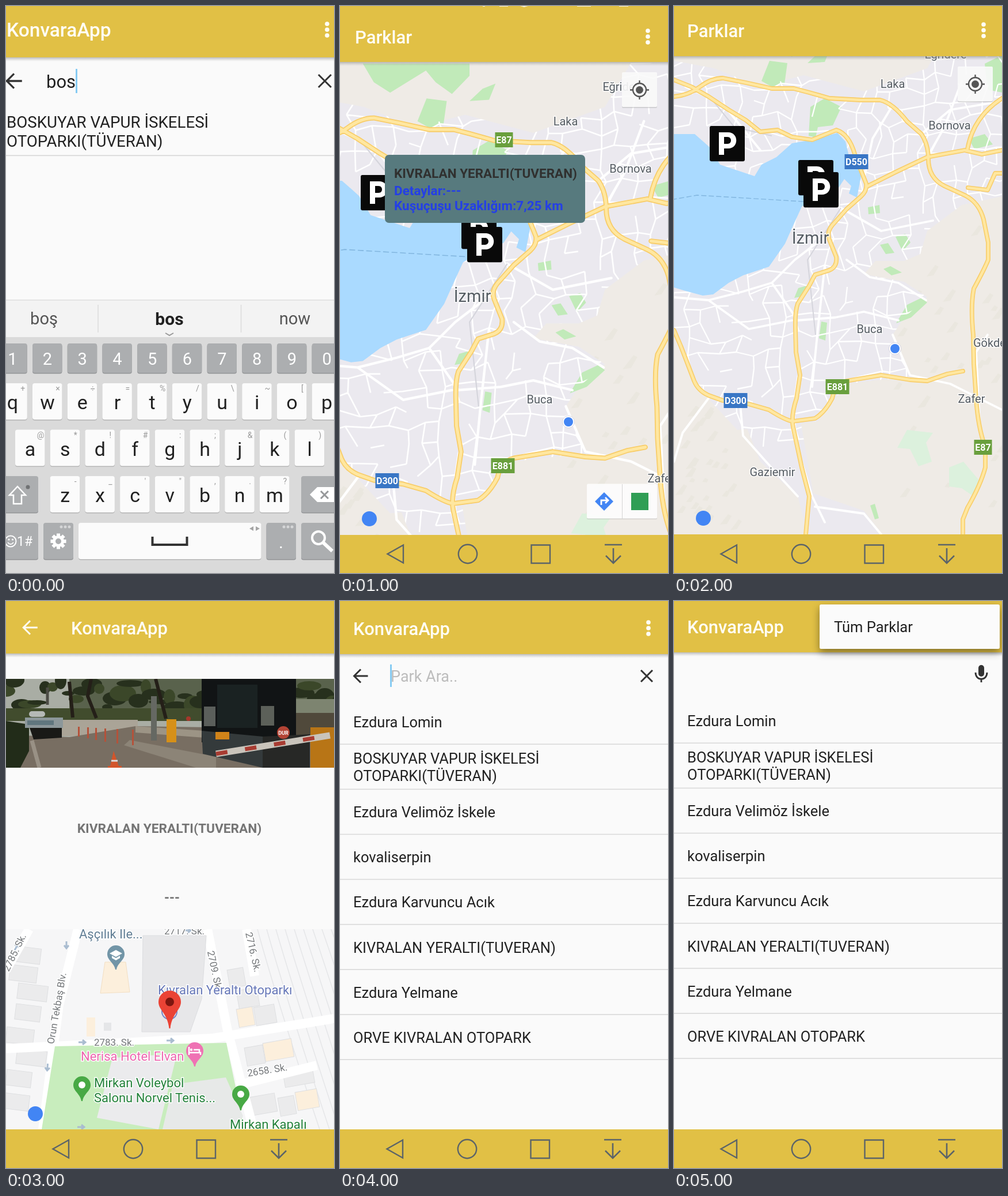
An HTML page that plays this animation: 570 by 983 pixels, repeating every 6 s.

```html
<!DOCTYPE html>
<html lang="tr">
<head>
<meta charset="utf-8">
<title>Park app tour</title>
<style>
  html, body { margin: 0; width: 100%; height: 100%; overflow: hidden; background: #fafafa; }
  svg { display: block; width: 570px; height: 983px; font-family: Roboto, sans-serif; }
</style>
</head>
<body>
<svg id="stage" viewBox="0 0 570 983"></svg>
<script>
const GOLD = '#e1c045', INK = '#212121', ICON = '#5c6468';
const SCENE_MS = 1000;

// Drawing helpers
const esc = s => s.replace(/&/g, '&amp;').replace(/</g, '&lt;');
const text = (x, y, size, s, fill = INK, extra = '') =>
  `<text x="${x}" y="${y}" font-size="${size}" fill="${fill}" ${extra}>${esc(s)}</text>`;
const rect = (x, y, w, h, fill, extra = '') =>
  `<rect x="${x}" y="${y}" width="${w}" height="${h}" fill="${fill}" ${extra}/>`;
const circle = (x, y, r, fill, extra = '') => `<circle cx="${x}" cy="${y}" r="${r}" fill="${fill}" ${extra}/>`;
const shape = (d, fill, extra = '') => `<path d="${d}" fill="${fill}" ${extra}/>`;
const line = (d, color, width, extra = '') =>
  `<path d="${d}" fill="none" stroke="${color}" stroke-width="${width}" ${extra}/>`;
const at = (x, y, body, more = '') => `<g transform="translate(${x} ${y}) ${more}">${body}</g>`;
const MID = 'text-anchor="middle"', BOLD = 'font-weight="700"', MEDIUM = 'font-weight="500"';
const ROUND = 'stroke-linejoin="round" stroke-linecap="round"';

let seed = 11;
const random = () => (seed = (seed * 16807) % 2147483647) / 2147483647;

// App chrome
const header = h => rect(0, 0, 570, h, GOLD) + rect(0, h, 570, 7, 'url(#shade)');
const title = (x, y, s, size = 31) => text(x, y, size, s, '#fffdf5', MEDIUM);
const dots = (x, y) => [-10, 0, 10].map(d => circle(x, y + d, 3.8, '#fffdf5')).join('');
const backArrow = (x, y, color, k = 1) =>
  at(x, y, line('M12.5 0H-11M0 -11.5L-11.5 0L0 11.5', color, 3), `scale(${k})`);
const cross = (x, y, r) => line(`M${x - r} ${y - r}l${2 * r} ${2 * r}m0 ${-2 * r}l${-2 * r} ${2 * r}`, '#333', 3);
const navBar = (top = 916, dx = 0) => rect(0, top, 570, 983 - top, GOLD) + at(dx, 0,
  line('M109 934.5V965.5L81.500 950Z', ICON, 2.4) +
  circle(221, 950, 16.2, 'none', `stroke="${ICON}" stroke-width="2.4"`) +
  line('M331.500 934.5H364V966H331.500Z', ICON, 2.4) +
  line('M459 934H489M474 940V965M461 953L474 966L487 953', ICON, 2.6));

// Keyboard
const key = (x, y, w, h, dark) =>
  rect(x, y + 1.5, w, h, dark ? '#929496' : '#b5b5b5', 'rx="4"') + rect(x, y, w, h, dark ? '#acaeb0' : '#fbfbfb', 'rx="4"');

function keyRow(chars, hints, x0, y) {
  return [...chars].map((c, i) => {
    const x = x0 + i * 60.7;
    return key(x, y, 51.5, 63) + text(x + 26, y + 45, 34, c, INK, MID) +
      (hints[i] ? text(x + 44, y + 14, 14, hints[i], '#999', MID) : '');
  }).join('');
}

function keyboard() {
  const numbers = [...'1234567890'].map((c, i) => {
    const x = -14.7 + i * 60.7;
    return key(x, 585, 51.5, 51, true) + text(x + 26, 622, 29, c, '#fff', MID);
  }).join('');
  const teeth = [0, 45, 90, 135, 180, 225, 270, 315].map(a =>
    rect(-3, -13.5, 6, 7, '#fff', `transform="rotate(${a})"`)).join('');
  const more = x => [0, 7, 14].map(d => circle(x + d, 903, 2.5, '#d5d6d7')).join('');
  return rect(0, 510, 570, 64, '#f3f3f3') + rect(0, 509, 570, 1.5, '#dedede') +
    rect(0, 574, 570, 409, '#dadada') +
    line('M160 518V566M408.500 518V566', '#dcdcdc', 1.5) +
    text(66, 552, 29, 'boş', '#555', MID) + text(284, 553, 30, 'bos', INK, MID + ' ' + BOLD) +
    text(502, 552, 29, 'now', '#555', MID) + line('M277 567L284 571L291 567', '#999', 2) +
    numbers +
    keyRow('qwertyuiop', '+×÷=%/\\~[', -14.7, 654) +
    keyRow('asdfghjkl', '@*!#:;&()', 16, 734.5) +
    keyRow('zxcvbnm', '-_\'",.?', 76.7, 815) +
    key(-20, 815, 76, 63, true) + key(513, 815, 80, 63, true) +
    [[-20, 76], [65, 52], [452.5, 51.5], [513, 80]].map(([x, w]) => key(x, 896, w, 63, true)).join('') +
    key(126, 896, 317.5, 63) +
    line('M20 833L34 848H27V863H13V848H6Z', '#fff', 2.5) + circle(38, 834, 3.5, '#707274') +
    shape('M528 847L541 834H580V860H541Z', '#fff') + line('M547 841l13 13m0 -13l-13 13', '#96989a', 3) +
    circle(8, 928, 9.5, 'none', 'stroke="#fff" stroke-width="2"') + circle(5, 925, 1.6, '#fff') + circle(11.5, 925, 1.6, '#fff') +
    line('M3 930Q8 936 13 930', '#fff', 1.8) + text(19, 936, 23, '1#', '#fff') +
    more(96) + more(483) +
    at(91, 928, teeth + circle(0, 0, 7.5, 'none', 'stroke="#fff" stroke-width="5"')) +
    line('M254.500 920V934H314.500V920', '#333', 4) +
    shape('M430 902V910L423 906ZM434 902V910L441 906Z', '#a5a5a5') + text(478, 940, 30, '.', '#fff', MID) +
    circle(543, 922, 11, 'none', 'stroke="#fff" stroke-width="4"') + line('M551 930L567 945', '#fff', 6);
}

// City map, shared by both map screens
const URBAN = 'M0 95L70 108L150 140L225 120L330 148L440 108L480 40H570V330L500 345L440 390L428 430L400 442H350L330 465L400 478L440 505L400 540L380 570L412 642L300 655L250 720L215 725L110 735L45 665L0 560Z' +
  'M110 690L220 720L242 845L330 875L362 916H232L215 850L150 790Z';
const SEA = 'M0 222H36L52 236L62 245L80 275L140 295L152 275L178 262L205 238L240 232L284 220L298 235L306 268L326 290L318 332L304 325L308 312L296 300L284 318L260 323L222 348L205 385L193 412L165 452L120 467L95 480L68 500L50 502L20 494L0 488Z';
const PARKS = 'M152 130L166 95L197 99L192 135L170 140ZM68 41H232V60L205 88L180 70L165 52L110 86L85 70ZM232 99L252 80L272 72L262 97ZM234 225L237 175L262 160L291 175L276 207L250 210L246 228ZM512 230L540 222L554 240L522 248ZM540 100L570 85V150L545 145ZM337 349L357 345L358 359L338 361ZM358 414L372 411L383 428L368 430ZM385 400L402 395L411 410L397 425ZM364 456L376 451L396 462L378 467ZM386 550L405 518L430 506L440 514L412 540ZM252 576L256 547L266 549L263 580ZM209 506L216 489L237 483L227 503ZM341 866L349 863L356 888L349 890Z';
const MEADOWS = 'M388 766L405 735L450 740L438 757L448 790L425 798L410 768ZM478 800L503 790L535 828L523 852L500 836L478 833Z';
const HIGHWAYS = [
  'M0 157Q25 155 45 140T85 125L125 133L170 143H208Q240 151 270 160L325 163H358Q380 168 405 200L430 222Q442 240 442 265Q442 298 470 312L505 328Q530 340 538 370L546 410V440Q540 455 521 490Q515 520 520 570L521 620L525 680Q528 730 541 765V800Q533 830 510 870L502 890V916',
  'M0 128L30 140L60 157L95 180L125 198L150 218L180 215L205 227L240 232L282 215Q305 222 315 260L334 308Q336 320 325 330L300 352L275 380Q265 392 270 405L282 435Q284 452 270 458L245 466L235 485L215 516Q210 530 211 560L212 600L219 640L213 680Q203 710 207 730L222 800L235 850L229 916',
  'M335 313L385 288L440 262L505 250L535 257L570 250M510 248Q515 220 530 198T570 160M511 315L545 319L558 290H570',
  'M0 562L12 590L35 650Q42 667 60 675L85 684L130 690L165 700Q195 719 207 720L245 715Q262 705 275 680Q280 655 300 650L360 640L410 648L440 650L475 638L502 633'
];
const STREETS = 'M0 505L60 510L120 495L170 480L210 440L262 400M60 510L130 560L205 545M170 480L215 545L280 540L330 530L390 545M290 350L360 390L450 372M300 440L340 470L390 480L438 510M380 570L410 640L480 655L570 700M262 450L250 560L240 660M20 140L85 170L150 250M205 735L240 850L262 895M115 690L120 745L160 790L215 850M0 790L15 740L60 680M380 172L345 230L330 300M430 222L480 180L570 165M440 262L470 210L500 130M245 868L330 880L360 916M545 570L525 600L531 720';

function streetWeb() {
  const step = 27, cols = 23, rows = 28, nodes = [];
  for (let r = 0; r < rows; r++) for (let c = 0; c < cols; c++)
    nodes.push([(c - .5) * step + random() * 17 + (r % 3) * 4, 35 + r * step + random() * 17 - c * 2]
      .map(Math.round));
  let d = '';
  nodes.forEach((p, i) => {
    if (i % cols < cols - 1 && random() < .64) d += `M${p}L${nodes[i + 1]}`;
    if (nodes[i + cols] && random() < .64) d += `M${p}L${nodes[i + cols]}`;
  });
  return line(d, '#fff', 2.3, 'clip-path="url(#urban)"');
}

function hills() {
  let d = '';
  for (let i = 0; i < 60; i++) {
    const left = i % 2, x = left ? random() * 100 : 360 + random() * 200;
    const y = left ? 690 + random() * 220 : 390 + random() * 480, s = 5 + random() * 12;
    d += `M${x.toFixed()} ${y.toFixed()}l${s.toFixed()} ${(-s * 1.3).toFixed()}l6 3l-${(s * .6).toFixed()} ${s.toFixed()}Z`;
  }
  return shape(d, '#e8e5db', 'opacity=".6"');
}

const world = () => rect(-40, 0, 660, 983, '#efebe6') + hills() + shape(URBAN, '#ebe9ef') +
  shape(MEADOWS, '#dcf1dd') + shape(PARKS, '#c1eab9') + streetWeb() + shape(SEA, '#aadaff') +
  line(STREETS, '#fff', 3.8, ROUND) + line('M290 350L232 440L246 570M60 155L105 210L170 225', '#d5d5dc', 2) +
  line('M-30 337L0 335L40 328L225 339', '#82b6df', 1.4, 'stroke-dasharray="9 4"') +
  line(HIGHWAYS.join(''), '#f8cd69', 7.8, ROUND) + line(HIGHWAYS.join(''), '#ffe7a0', 4.6, ROUND);

const place = (x, y, s, size = 20) => text(x, y, size, s, '#555c63',
  `${MID} stroke="#fff" stroke-width="3" stroke-opacity=".75" paint-order="stroke"`);
const shield = (x, y, s, color) => {
  const w = s.length * 10 + 1;
  return rect(x - w / 2, y - 13, w, 26, color) + text(x, y + 6, 16, s, '#fff', MID + ' ' + BOLD);
};
const GREEN = '#699f3d', BLUE = '#3976c5';
const parkMarker = (x, y) => at(x, y, rect(0, 1, 61, 61, '#000', 'rx="4" opacity=".3"') +
  rect(0, 0, 61, 61, '#090909', 'rx="3"') +
  shape('M16 11H32C51 11 51 39 32 39H25V50H16ZM25 19V31H31C39 31 39 19 31 19Z', '#fff', 'fill-rule="evenodd"'));
const locateButton = (x, y) => at(x, y, rect(0, 1, 61, 61, '#aaa', 'rx="2" opacity=".4"') +
  rect(0, 0, 61, 60, '#fff', 'rx="2" opacity=".85"') + circle(30.5, 30.5, 6.5, '#555') +
  circle(30.5, 30.5, 11.5, 'none', 'stroke="#555" stroke-width="2.3"') +
  line('M30.500 14V20M30.500 41V47M14 30.500H20M41 30.500H47', '#555', 2.3));
const here = (x, y) => circle(x, y, 10.5, '#fff', 'stroke="#ccd" stroke-width=".8"') + circle(x, y, 8, '#4285f4');
const mapBadge = y => circle(51, y, 13, '#4285f4');

// Screens
const APP = 'KonvaraApp', SITE = 'KIVRALAN YERALTI(TUVERAN)';
const ROWS = [
  'Ezdura Lomin', ['BOSKUYAR VAPUR İSKELESİ', 'OTOPARKI(TÜVERAN)'], 'Ezdura Velimöz İskele', 'kovaliserpin',
  'Ezdura Karvuncu Acık', SITE, 'Ezdura Yelmane', 'ORVE KIVRALAN OTOPARK'
];

const parkList = (x, y) => ROWS.map((row, i) => {
  const base = y + i * 78.1;
  const label = Array.isArray(row)
    ? row.map((s, n) => text(x, base - 15 + n * 30, 25.5, s)).join('')
    : text(x, base, 25.5, row);
  return label + rect(0, base + 28.5, 570, 1.6, '#d9d9d9');
}).join('');

const typing = () => header(89) + title(1, 53, APP, 33.5) + dots(558, 41) + backArrow(14, 130, '#333', 1.1) +
  text(70, 142, 31, 'bos') + rect(121, 109, 3, 42, '#86cbf3') + cross(554, 130, 11) +
  ROWS[1].map((s, n) => text(1, 211 + n * 32.5, 27.7, s)).join('') +
  rect(0, 258.5, 570, 1.6, '#d6d6d6') + keyboard();

const mapClose = () => `<use href="#world" transform="matrix(1.131 0 0 1.1236 -37.3 53.6)"/>` +
  place(493, 147, 'Eğridere') + place(392, 207, 'Laka') + place(505, 289, 'Bornova') +
  place(230, 513, 'İzmir', 29) + place(347, 689, 'Buca') + place(558, 826, 'Zafer') +
  shield(285, 232, 'E87', GREEN) + shield(283, 797, 'E881', GREEN) + shield(82, 823, 'D300', BLUE) +
  parkMarker(36, 293) + parkMarker(211, 360) + parkMarker(221, 383) + here(397, 721) +
  rect(78, 258, 348, 118, '#577a7e', 'rx="7"') + text(94, 298, 22.5, SITE, '#30302f', BOLD) +
  text(94, 328, 22.5, 'Detaylar:---', '#243fe6', BOLD) +
  text(94, 354, 22.5, 'Kuşuçuşu Uzaklığım:7,25 km', '#243fe6', BOLD) +
  locateButton(490, 115) +
  rect(429, 829, 122, 61, '#aaa', 'rx="2" opacity=".4"') + rect(429, 828.5, 122, 60, '#fff', 'rx="2" opacity=".92"') +
  rect(490, 829, 1, 60, '#d5d5d5') +
  shape('M459 843L475 859L459 875L443 859Z', '#4285f4') + line('M454 865V857H465M461 852L466 857L461 862', '#fff', 2.8) +
  rect(506, 844, 30, 30, '#2f9e55') + mapBadge(889) +
  header(97) + title(26, 65, 'Parklar') + dots(535, 53) +
  shape('M277 0H292V1H277ZM313 0H327L320 2ZM412 0H436V1H412ZM485 0H501V1H485ZM248 0H252V1H248Z', '#fff', 'opacity=".8"') +
  navBar(917, 1);

const mapWide = () => '<use href="#world"/>' +
  place(472, 91, 'Eğridere') + place(380, 142, 'Laka') + place(479, 214, 'Bornova') +
  place(237, 412, 'İzmir', 29) + place(340, 567, 'Buca') + place(557, 591, 'Gökdere') +
  place(517, 688, 'Zafer') + place(171, 815, 'Gaziemir') +
  shield(317, 270, 'D550', BLUE) + shield(284, 660, 'E881', GREEN) + shield(107, 684, 'D300', BLUE) +
  shield(537, 765, 'E87', GREEN) +
  parkMarker(62, 208) + parkMarker(216, 267) + parkMarker(225, 288) + here(384, 594) +
  locateButton(493, 105) + mapBadge(888) + header(87) + title(23, 54, 'Parklar') + dots(538, 42) + navBar();

function photo() {
  let trees = '';
  for (let i = 0; i < 44; i++)
    trees += `<ellipse cx="${(i * 13.5).toFixed()}" cy="${(137 + random() * 48).toFixed()}" rx="${(9 + random() * 15).toFixed()}" ry="${(4 + random() * 12).toFixed()}" fill="${i % 3 ? '#27301d' : '#3b4729'}"/>`;
  const posts = [125, 141, 155, 171, 192, 219].map((x, i) => rect(x, 218 + i, 3, 17 + i * 2, '#b4523a')).join('');
  const body = rect(0, 135, 570, 154, '#a9ada4') + rect(110, 135, 460, 60, '#59624c') + trees +
    rect(0, 186, 570, 22, '#414c2d') +
    line('M148 135L142 165L157 203M110 140L116 202M260 135L278 204', '#241f18', 6) + line('M72 150V180', '#4c4c45', 5) +
    rect(40, 191, 28, 10, '#b5b9b6', 'rx="5"') + rect(97, 206, 132, 28, '#aaa497') +
    shape('M0 232L110 236L225 217L570 222V289H0Z', '#786e62') + shape('M225 217L345 225V237L225 228Z', '#9c9485') +
    shape('M215 241L365 270V289H330L205 250Z', '#8c8477') +
    shape('M0 208L40 214V260L25 289H0Z', '#222c19') + shape('M40 217L97 214V237L48 240Z', '#191916') +
    rect(33, 202, 66, 18, '#8c979a') + rect(37, 207, 46, 8, '#60767e') + line('M45 242L58 289', '#999185', 7) + posts +
    rect(252, 165, 10, 77, '#656862') + rect(279, 205, 17, 40, '#d69018') +
    rect(504, 170, 66, 24, '#7d8470') + rect(504, 194, 66, 50, '#50493b') + circle(317, 204, 4, '#a5372b') +
    rect(340, 135, 164, 110, '#111415') + rect(367, 145, 70, 75, '#1a2222') + rect(443, 182, 23, 34, '#5c6059') +
    rect(344, 183, 20, 34, '#5b5f5b') + shape('M340 225L446 235V289L342 265Z', '#343a3b') +
    shape('M446 235L528 231V289H446Z', '#272826') + rect(364, 227, 24, 13, '#d08319') +
    rect(529, 219, 41, 70, '#b87516') + circle(482, 228, 11, '#b34435') + text(482, 232, 9, 'DUR', '#fff', MID + ' ' + BOLD) +
    line('M365 265L563 233', '#c9c4bb', 11) + line('M365 265L563 233', '#a83c32', 7, 'stroke-dasharray="20 31"') +
    shape('M187 260L196 286H201V289H177V286H181Z', '#d2552b') + line('M183 277H194', '#ddd', 3);
  return `<g clip-path="url(#photoFrame)">${body}</g>`;
}

const pin = (x, y, r, tip, color) =>
  shape(`M${x - r} ${y}A${r} ${r} 0 1 1 ${x + r} ${y}C${x + r} ${y + r * .75} ${x + r * .2} ${y + r} ${x + 1} ${tip}H${x - 1}C${x - r * .2} ${y + r} ${x - r} ${y + r * .75} ${x - r} ${y}Z`, color);
const street = (x, y, s, angle = 0) => at(x, y, text(0, 0, 17, s, '#74777a',
  MID + ' stroke="#fff" stroke-width="3" paint-order="stroke"'), `rotate(${angle})`);
const poi = (x, y, s, color, size = 22) => text(x, y, size, s, color, 'stroke="#fff" stroke-width="3" paint-order="stroke"');

function streetMap() {
  const houses = [[18, 598], [8, 630], [22, 662], [18, 698], [2, 738], [20, 775], [2, 812], [-6, 852]]
    .map(([x, y], i) => at(x, y, rect(0, 0, 44 + i % 3 * 4, 27, '#ebebec', 'stroke="#dedfe1"'), 'rotate(7)')).join('');
  const right = [[384, 640, 28], [400, 676, 36], [400, 708, 28], [430, 705, 36], [414, 775, 32], [446, 767, 50], [415, 862, 52], [472, 862, 28], [502, 852, 38], [480, 812, 52]]
    .map(([x, y, w], i) => at(x, y, rect(0, 0, w, 32, i % 3 == 2 ? '#fcefdc' : '#ebebec', 'stroke="#dedfe1"'), 'rotate(-10)')).join('');
  let rails = '';
  for (let i = 0; i < 9; i++) rails += `M${437 + i * 16} 569Q${470 + i * 16} ${690 - i * 4} ${545 + i * 17} 916`;
  const arrows = [[105, 596, 90], [72, 808, 95], [132, 765, 0], [285, 762, 0], [18, 600, -60], [315, 571, 0], [130, 912, 0]]
    .map(([x, y, a]) => at(x, y, line('M-6 0H5M1 -4L6 0L1 4', '#a9bcd0', 3), `rotate(${a})`)).join('');
  return rect(0, 569, 570, 347, '#f6f6f7') + line(rails, '#e5e6e8', 1.5) + houses + right +
    line('M125 569L92 700L64 916M0 776L360 758L570 724M350 569L385 745L430 916M418 569L432 650M0 640L40 569M400 840L540 805', '#fff', 16) +
    shape('M85 772L383 766L412 905L400 916H62Z', '#c8edbd') +
    shape('M185 792L297 785L265 916L158 896Z', '#ebebed') + shape('M290 838L382 826L412 893L395 916H272Z', '#e7e9e8') +
    shape('M238 580H348L340 690L320 747H236Z', '#e7e7e9', 'stroke="#dcdde0"') +
    shape('M172 626H208L215 678L164 680Z', '#fcefdc', 'stroke="#f3dfc3"') + rect(140, 722, 15, 33, '#fcefdc') +
    rect(170, 731, 13, 14, '#e5e6e8') + arrows +
    street(310, 578, '2717. Sk.') + street(20, 612, '2785. Sk.', -64) + street(357, 642, '2709. Sk.', 78) +
    street(424, 610, '2716. Sk.', 77) + street(188, 771, '2783. Sk.') + street(455, 819, '2658. Sk.', -9) +
    street(94, 707, 'Orun Tekbaş Blv.', -80) +
    poi(127, 585, 'Aşçılık İle...', '#607d94') + poi(264, 682, 'Kıvralan Yeraltı Otoparkı', '#6677b8') +
    poi(130, 797, 'Nerisa Hotel Elvan', '#ed65ae') + poi(153, 843, 'Mirkan Voleybol', '#23813a') +
    poi(153, 869, 'Salonu Norvel Tenis...', '#23813a') + poi(389, 915, 'Mirkan Kapalı', '#23813a') +
    pin(191, 612, 15, 639, '#7295a7') + shape('M180 611L191 605L202 611L191 617ZM184 615L191 619L198 615V619L191 623L184 619Z', '#fff') +
    pin(328, 780, 15, 807, '#ef72b4') + line('M318 773V787M318 783H338V787M326 778H336V782', '#fff', 2.5) + circle(322, 778, 2.2, '#fff') +
    pin(132, 839, 15, 867, '#48a945') + circle(132, 839, 6, '#fff') +
    pin(408, 855, 15, 883, '#48a945') + circle(408, 855, 6, '#fff') +
    circle(284, 712, 13, 'none', 'stroke="#7584c6" stroke-width="2"') +
    pin(284.5, 695, 19.5, 741, '#ea4335') + circle(284.5, 695, 7.5, '#7d160f') + mapBadge(889);
}

const detail = () => header(91) + backArrow(42, 46, '#fffdf5', 1.02) + title(113, 58, APP) + photo() +
  text(284, 402, 22.7, SITE, '#757575', MID + ' ' + BOLD) + text(288.5, 522, 23, '---', '#757575', MID + ' ' + BOLD) +
  `<g clip-path="url(#lowerMap)">${streetMap()}</g>` + navBar();

const search = () => header(92) + title(23, 59, APP) + dots(536, 47) + backArrow(36, 130, '#333') +
  text(88, 140, 27, 'Park Ara..', '#bdbdbd') + rect(87, 110, 3, 39, '#86cbf3') + cross(533, 130, 10) +
  parkList(23, 219) + navBar();

const menu = () => header(89) + title(23, 56, APP) +
  rect(253, 6, 313, 77, '#fbfbfb', 'rx="3" filter="url(#lift)"') + text(278, 54, 25.5, 'Tüm Parklar') +
  rect(529, 111, 10, 20, '#333', 'rx="5"') + line('M524 124C524 139 544 139 544 124M534 135V141', '#333', 2.8) +
  parkList(23, 217) + navBar();

const stage = document.getElementById('stage');
stage.innerHTML = `<defs>
  <linearGradient id="shade" x2="0" y2="1"><stop stop-color="#888" stop-opacity=".55"/><stop offset="1" stop-color="#aaa" stop-opacity="0"/></linearGradient>
  <filter id="lift" x="-10%" y="-30%" width="120%" height="180%"><feDropShadow dx="0" dy="6" stdDeviation="7" flood-opacity=".42"/></filter>
  <clipPath id="urban"><path d="${URBAN}"/></clipPath>
  <clipPath id="photoFrame"><rect y="135" width="570" height="154"/></clipPath>
  <clipPath id="lowerMap"><rect y="569" width="570" height="347"/></clipPath>
  <g id="world">${world()}</g>
</defs>` + rect(0, 0, 570, 983, '#fafafa') +
  [typing, mapClose, mapWide, detail, search, menu].map(draw => `<g class="scene">${draw()}</g>`).join('');

const scenes = [...stage.querySelectorAll('.scene')];
const start = performance.now();
function show() {
  const elapsed = Math.max(0, performance.now() - start);
  const current = Math.floor(elapsed / SCENE_MS) % scenes.length;
  scenes.forEach((scene, i) => { scene.style.display = i === current ? '' : 'none'; });
  requestAnimationFrame(show);
}
show();
</script>
</body>
</html>
```
